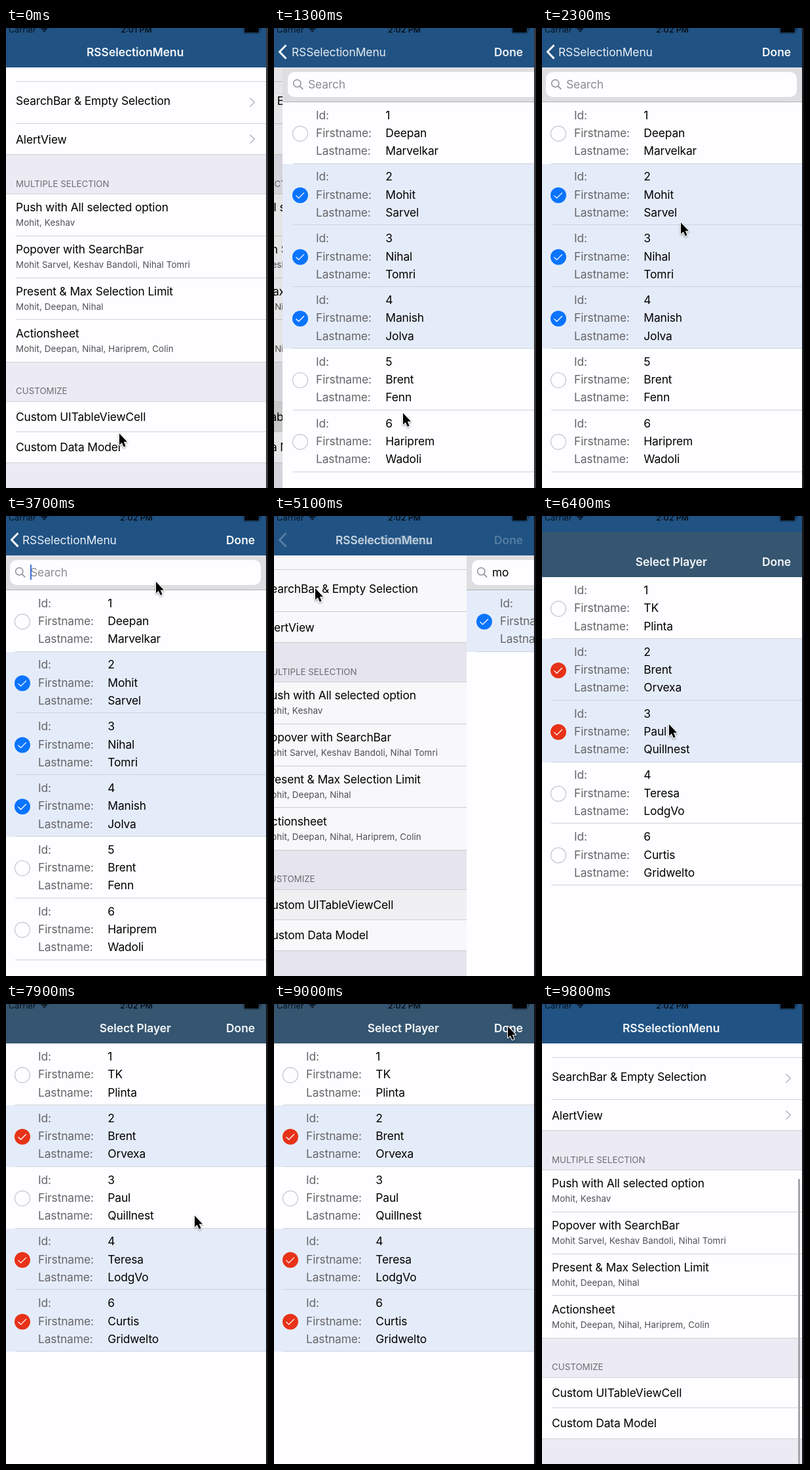
Write an HTML page with a canvas that moves like this. It is 400x700 px and loops after 10000 ms.

```html
<!DOCTYPE html>
<html lang="en">
<head>
<meta charset="utf-8">
<title>RSSelectionMenu demo</title>
<style>
html, body { margin: 0; width: 100%; height: 100%; overflow: hidden; background: #fefdff; }
canvas { display: block; width: 400px; height: 700px; }
</style>
</head>
<body>
<canvas id="stage"></canvas>
<script>
const LOOP = 10000, STEP = 100, W = 397, H = 700, PAGE = 709;
const FONT = 'Inter, "Liberation Sans", sans-serif';
const BLUE = '#205283', SLATE = '#355570', WHITE = '#fefdff', GROUP = '#ecebf4',
      LINE = '#d2d1d7', PICKED = '#e5ecf9', PRESS = '#dcdcde';

const canvas = document.getElementById('stage');
const ctx = canvas.getContext('2d');
const dpr = window.devicePixelRatio || 1;
canvas.width = 400 * dpr;
canvas.height = H * dpr;

const PUSH = 1016, POP = 4950, PRESENT = 6130, DISMISS = 9080;

const MENU = [
  [273, 'Push with All selected option', 'Mohit, Keshav'],
  [337, 'Popover with SearchBar', 'Mohit Sarvel, Keshav Bandoli, Nihal Tomri'],
  [401, 'Present & Max Selection Limit', 'Mohit, Deepan, Nihal'],
  [465, 'Actionsheet', 'Mohit, Deepan, Nihal, Hariprem, Colin']
];
const PLAYERS = [
  [1, 'Deepan', 'Marvelkar'], [2, 'Mohit', 'Sarvel'], [3, 'Nihal', 'Tomri'],
  [4, 'Manish', 'Jolva'], [5, 'Brent', 'Fenn'], [6, 'Hariprem', 'Wadoli']
];
const STAFF = [
  [1, 'TK', 'Plinta'], [2, 'Brent', 'Orvexa'], [3, 'Paul', 'Quillnest'],
  [4, 'Teresa', 'LodgVo'], [6, 'Curtis', 'Gridwelto']
];
// id -> time of the tap that toggles it
const TAPS = { 4: 6800, 6: 7200, 3: 7600 };

// time, x, y of the pointer tip
const PATH = [
  [0, 173, 617], [300, 185, 592], [900, 186, 591], [1300, 197, 586], [1900, 206, 480],
  [2000, 210, 450], [2700, 215, 92], [3100, 222, 97], [3700, 229, 100], [4200, 233, 104],
  [4800, 60, 38], [5000, 52, 36], [5800, 146, 628], [6000, 152, 629], [6400, 194, 317],
  [6800, 215, 385], [7200, 228, 480], [7400, 232, 490], [7600, 262, 300], [7900, 288, 322],
  [8600, 352, 38], [9000, 357, 34], [9500, 361, -40]
];

const clamp = v => Math.max(0, Math.min(1, v));

function spring(t, start) {
  const d = t - start;
  if (d <= 0) return 0;
  if (d >= 520) return 1;
  const x = d * 0.0178;
  return 1 - (1 + x) * Math.exp(-x);
}

function rect(x, y, w, h, color) {
  ctx.fillStyle = color;
  ctx.fillRect(x, y, w, h);
}

function pill(x, y, w, h, r, color) {
  ctx.fillStyle = color;
  ctx.beginPath();
  ctx.roundRect(x, y, w, h, r);
  ctx.fill();
}

function line(points, color, width) {
  ctx.strokeStyle = color;
  ctx.lineWidth = width;
  ctx.beginPath();
  points.forEach(([x, y]) => ctx.lineTo(x, y));
  ctx.stroke();
}

// y is the middle of the capitals
function text(str, x, y, { size = 17.45, color = '#000', weight = 400, track = -0.16, align = 'left' } = {}) {
  ctx.font = `${weight} ${size}px ${FONT}`;
  ctx.letterSpacing = track + 'px';
  ctx.textAlign = align;
  ctx.fillStyle = color;
  ctx.fillText(str, x, y + size * 0.36);
  return ctx.measureText(str).width;
}

function faded(alpha, draw) {
  if (alpha <= 0) return;
  ctx.save();
  ctx.globalAlpha *= alpha;
  draw();
  ctx.restore();
}

// whole pixels keep the page edges crisp
function shifted(x, y, draw) {
  ctx.save();
  ctx.translate(Math.floor(x), Math.floor(y));
  draw();
  ctx.restore();
}

const hair = (x, y) => rect(x, y, W - x, 1, LINE);
const bold = { weight: 600, color: '#f4f7fa', track: -0.06 };

function menu(t, push, modal) {
  rect(0, 59, W, H, GROUP);
  rect(0, 59, W, 134, WHITE);
  rect(0, 252, W, 256, WHITE);
  rect(0, 568, W, 93, WHITE);
  if (t >= 900) faded(t < POP ? 1 : push, () => rect(0, 568, W, 47, PRESS));
  if (t >= 6000) faded(t < DISMISS ? 1 : modal, () => rect(0, 614, W, 47, PRESS));
  [81, 145, 316, 380, 443, 614].forEach(y => hair(15, y));
  [192, 252, 508, 568, 661].forEach(y => hair(0, y));

  text('SearchBar & Empty Selection', 15, 111);
  text('AlertView', 15, 170);
  [113, 169].forEach(y => line([[372.5, y - 6.5], [379.5, y], [372.5, y + 6.5]], '#c2c2c8', 1.8));

  const head = { size: 13.35, color: '#6d6d72', track: 0 };
  text('MULTIPLE SELECTION', 15, 237, head);
  text('CUSTOMIZE', 15, 552.5, head);
  MENU.forEach(([y, title, detail]) => {
    text(title, 15, y);
    text(detail, 15, y + 23, { size: 13.4, color: '#505054', track: 0.08 });
  });
  text('Custom UITableViewCell', 15, 591.5);
  text('Custom Data Model', 15, 638);

  const bar = t >= 9600 ? (t - 9600) / 200 : t < 8000 ? (t - 5400) / 200 : 0;
  faded(clamp(bar), () => pill(391, 266, 3, 434, 1.5, '#a5a5a9'));
}

function tick(y, on, color) {
  ctx.beginPath();
  ctx.arc(25, y, on ? 12 : 11.5, 0, Math.PI * 2);
  if (!on) {
    ctx.strokeStyle = '#c3c3c8';
    ctx.lineWidth = 1.2;
    ctx.stroke();
    return;
  }
  ctx.fillStyle = color;
  ctx.fill();
  line([[18.5, y + 0.3], [22.6, y + 4.3], [31, y - 4]], '#fff', 1.3);
}

function people(list, top, color, isOn, isPressed) {
  const h = 93.8, rowTop = i => Math.round(top + i * h);
  list.forEach(([id, first, last], i) => {
    const y = top + i * h, on = isOn(id), edge = rowTop(i), end = rowTop(i + 1);
    if (on) rect(-2, edge, W + 2, end - edge, PICKED);
    if (isPressed(id)) rect(-2, edge, W + 2, end - edge, PRESS);
    rect(14, end - 1, W - 14, 1, on ? '#c9d2e0' : LINE);
    tick(y + 48, on, color);
    [['Id:', id], ['Firstname:', first], ['Lastname:', last]].forEach(([label, value], k) => {
      const ty = y + 19.6 + k * 27.3;
      text(label, 49, ty, { color: '#666669' });
      text(String(value), 155.3, ty);
    });
  });
}

function searchPage(t) {
  const query = t < 4000 ? '' : t < 4200 ? 'm' : 'mo';
  rect(-2, 59, W + 2, H, WHITE);
  rect(-2, 60, W + 2, 52, '#dedee0');
  rect(-2, 112, W + 2, 1, '#b0b0b3');
  pill(6, 67, 383, 38, 10, WHITE);
  ctx.strokeStyle = '#8b8b90';
  ctx.lineWidth = 1.4;
  ctx.beginPath();
  ctx.arc(20.3, 84.3, 5.6, 0, Math.PI * 2);
  ctx.stroke();
  line([[24.4, 88.4], [29.3, 93.3]], '#8b8b90', 1.6);
  const width = query ? text(query, 37, 86) : 0;
  if (!query) text('Search', 37, 86, { color: '#8e8e93' });
  if (t >= 2700 && t < POP && (t - 2700) % 1000 < 500) rect(37 + width, 74, 2, 23, '#3f74d8');
  const found = PLAYERS.filter(p => p[1].toLowerCase().startsWith(query));
  people(found, 112.8, '#0a74ff', id => id > 1 && id < 5, () => false);
}

function modalPage(t) {
  rect(0, -9, W, PAGE, WHITE);
  rect(0, -9, W, 69, SLATE);
  text('Select Player', 197.3, 36.5, { ...bold, align: 'center' });
  text('Done', 380, 36.5, { ...bold, align: 'right' });
  const isOn = id => (id === 2 || id === 3) !== (t >= TAPS[id]);
  people(STAFF, 60.2, '#e83219', isOn, id => t === TAPS[id] - STEP);
}

function navBar(push) {
  rect(0, 0, W, 60, BLUE);
  const x = 25 + 98 * (1 - push) ** 1.2;
  faded(1 - push, () => text('RSSelectionMenu', x, 36.5, bold));
  faded(push, () => {
    text('RSSelectionMenu', x, 36.5, { color: '#e9eff5', track: -0.1 });
    line([[18.5, 26], [8.5, 36.3], [18.5, 46.6]], '#f4f7fa', 3);
    text('Done', 380, 36.5, { ...bold, align: 'right' });
  });
}

function statusBar(t) {
  const ink = '#06101a';
  text('Carrier', 4, 2.5, { size: 12.6, color: ink, track: 0.1 });
  text(t < 200 ? '2:01 PM' : '2:02 PM', 199, 2.5, { size: 12.4, color: ink, weight: 600, track: 0, align: 'center' });
  ctx.strokeStyle = ink;
  ctx.lineWidth = 2;
  [9, 5.6, 2].forEach(r => {
    ctx.beginPath();
    ctx.arc(58.5, 6.5, r, -Math.PI * 0.76, -Math.PI * 0.24);
    ctx.stroke();
  });
  faded(0.45, () => {
    ctx.lineWidth = 1;
    ctx.beginPath();
    ctx.roundRect(362.5, -4.5, 25, 13, 3);
    ctx.stroke();
    rect(388.5, 0, 1.5, 4, ink);
  });
  pill(364, -3, 22, 10, 1.5, '#000');
}

function pointer(t) {
  const i = PATH.findIndex(k => k[0] > t);
  if (i < 0) return;
  const [t0, x0, y0] = PATH[i - 1], [t1, x1, y1] = PATH[i];
  const u = (t - t0) / (t1 - t0);
  shifted(x0 + (x1 - x0) * u, y0 + (y1 - y0) * u, () => {
    ctx.scale(0.87, 0.87);
    ctx.beginPath();
    [[0, 0], [0, 20], [4.4, 16], [7.8, 23.6], [11, 22.2], [7.8, 14.6], [13.8, 14.6]]
      .forEach(([x, y]) => ctx.lineTo(x, y));
    ctx.closePath();
    ctx.lineJoin = 'round';
    ctx.shadowColor = 'rgba(0,0,0,.35)';
    ctx.shadowBlur = 3;
    ctx.shadowOffsetY = 1.5;
    ctx.strokeStyle = '#fff';
    ctx.lineWidth = 2.4;
    ctx.stroke();
    ctx.shadowColor = 'transparent';
    ctx.fillStyle = '#000';
    ctx.fill();
  });
}

function draw(t) {
  const push = spring(t, PUSH) - spring(t, POP);
  const modal = spring(t, PRESENT) - spring(t, DISMISS);
  ctx.setTransform(dpr, 0, 0, dpr, 0, 0);
  rect(0, 0, 400, H, t < 1400 ? '#37373b' : '#17171b');

  ctx.save();
  ctx.beginPath();
  ctx.rect(0, 0, W, H);
  ctx.clip();
  rect(0, 0, W, H, WHITE);
  if (push < 1) {
    shifted(-0.3 * W * push, 0, () => menu(t, push, modal));
    faded(push * 0.1, () => rect(0, 59, W, H, '#000'));
  }
  if (push > 0) shifted(W * (1 - push), 0, () => searchPage(t));
  navBar(push);
  if (modal > 0) shifted(0, PAGE * (1 - modal), () => modalPage(t));
  statusBar(t);
  ctx.restore();
  pointer(t);
}

const begin = performance.now();
function loop() {
  const t = (performance.now() - begin) % LOOP;
  draw(Math.min(9800, Math.floor(t / STEP) * STEP));
  requestAnimationFrame(loop);
}
loop();
</script>
</body>
</html>
```
